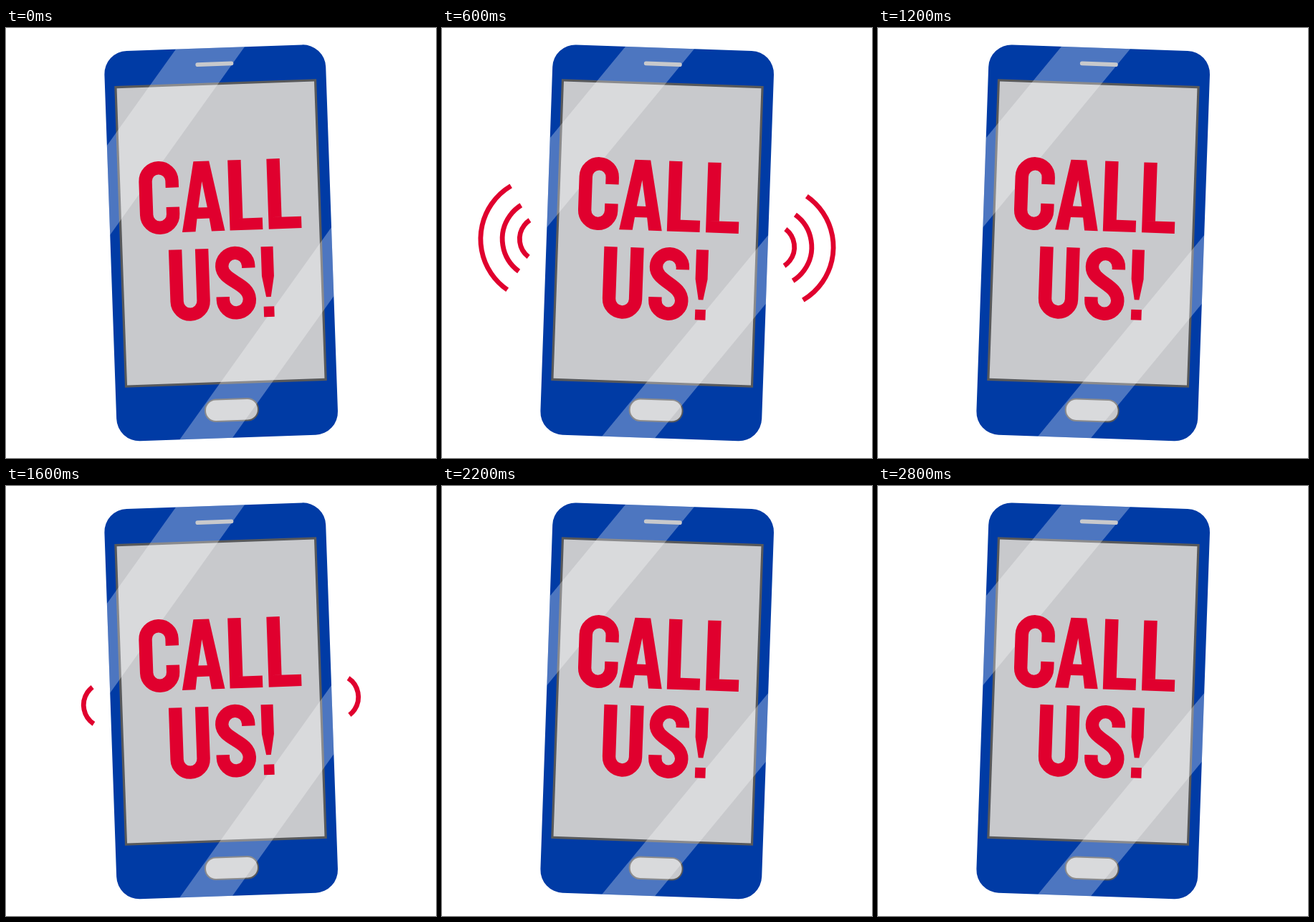
Animation, 600 px wide and 600 px high, one loop 3.2 s. Source, as an HTML page with a canvas:

```html
<!DOCTYPE html>
<html lang="en">
<head>
<meta charset="utf-8">
<title>Call us!</title>
<style>
html, body { margin: 0; width: 100%; height: 100%; overflow: hidden; background: #fff; }
canvas { display: block; width: 600px; height: 600px; }
</style>
</head>
<body>
<canvas id="stage" width="600" height="600" role="img" aria-label="CALL US!"></canvas>
<script>
const ctx = document.getElementById('stage').getContext('2d');
const BLUE = '#003ba5', GREY = '#c8c9cc', EDGE = '#58595b', RED = '#e0002e';
const SIZE = 600, MID = SIZE / 2, RAD = Math.PI / 180;
const STEP = 200, STEPS = 16;

// Lettering metrics: cap height, stem width, bowl radius, overshoot
const CAP = 98, STEM = 18.4, BOWL = 18.5, OVER = 2;

// Rounded box given by its centre
function box(cx, cy, w, h, r, fill, line) {
  ctx.beginPath();
  ctx.roundRect(cx - w / 2, cy - h / 2, w, h, r);
  ctx.fillStyle = fill;
  ctx.fill();
  if (!line) return;
  ctx.strokeStyle = EDGE;
  ctx.lineWidth = line;
  ctx.stroke();
}

// Slanted light band, x and width measured at height y
function sheen(x, y, w) {
  const slope = 0.769, top = x + y * slope, low = top - SIZE * slope;
  ctx.beginPath();
  ctx.moveTo(top, 0);
  ctx.lineTo(top + w, 0);
  ctx.lineTo(low + w, SIZE);
  ctx.lineTo(low, SIZE);
  ctx.fillStyle = 'rgba(255,255,255,0.3)';
  ctx.fill();
}

function phone() {
  box(MID + 0.2, MID - 0.2, 309, 544.6, 32, BLUE);
  ctx.save();
  ctx.clip();
  box(MID, 286.5, 278.8, 417.8, 0, GREY, 3.2);
  box(306.8, 533.4, 74, 30.6, 15, GREY, 2);
  sheen(246.5, 27.5, 96);
  sheen(232.5, 572.5, 73.8);
  ctx.restore();
  box(MID - 0.4, 50.1, 53, 5.8, 2.9, GREY);
}

// Closed shape mirrored about cx, from [half width, y] pairs
function mirrored(cx, y, pairs) {
  pairs.forEach(([dx, dy], i) => ctx[i ? 'lineTo' : 'moveTo'](cx + dx, y + dy));
  [...pairs].reverse().forEach(([dx, dy]) => ctx.lineTo(cx - dx, y + dy));
  ctx.closePath();
}

function letterA(cx, y) {
  mirrored(cx, y, [[10.9, 0], [29.8, CAP], [11.2, CAP], [8.6, 80]]);
  mirrored(cx, y, [[0, 28], [6.3, 64.5]]);
}

function letterL(x, y) {
  ctx.rect(x, y, STEM, CAP - 16.4);
  ctx.rect(x, y + CAP - 16.4, 45.8, 16.4);
}

function bang(cx, y) {
  mirrored(cx, y, [[8.5, 0], [8.5, 41], [3.3, 70]]);
  ctx.rect(cx - 7.3, y + CAP - 14.5, 14.6, 14.5);
}

// Centres of the upper and lower bowl of a round letter
const upper = y => y - OVER + STEM / 2 + BOWL;
const lower = y => y + CAP + OVER - STEM / 2 - BOWL;

function letterC(cx, y) {
  ctx.moveTo(cx + BOWL, y + 35.3);
  ctx.arc(cx, upper(y), BOWL, 0, Math.PI, true);
  ctx.arc(cx, lower(y), BOWL, Math.PI, 0, true);
  ctx.lineTo(cx + BOWL, y + 62.4);
}

function letterU(cx, y) {
  ctx.moveTo(cx - BOWL, y);
  ctx.arc(cx, lower(y), BOWL, Math.PI, 0, true);
  ctx.lineTo(cx + BOWL, y);
}

function letterS(cx, y) {
  const a = upper(y), b = lower(y);
  ctx.moveTo(cx + BOWL, y + 28.7);
  ctx.arc(cx, a, BOWL, 0, Math.PI, true);
  ctx.bezierCurveTo(cx - BOWL, a + 21, cx + BOWL, b - 23, cx + BOWL, b);
  ctx.arc(cx, b, BOWL, 0, Math.PI);
  ctx.lineTo(cx - BOWL, y + 68);
}

function lettering() {
  const call = 185, us = 307.3;
  ctx.fillStyle = ctx.strokeStyle = RED;
  ctx.lineWidth = STEM;

  ctx.beginPath();
  letterA(276.3, call);
  letterL(313.2, call);
  letterL(367.4, call);
  bang(363.8, us);
  ctx.fill('evenodd');

  ctx.beginPath();
  letterC(216.1, call);
  letterU(254.3, us);
  letterS(318.6, us);
  ctx.stroke();
}

function waves(count) {
  ctx.strokeStyle = RED;
  ctx.lineWidth = 6.8;
  for (let i = 0; i < count; i++) {
    const r = 31.5 + 21 * i + 3.1 * i * i, half = (54.5 + 1.5 * i) * RAD;
    for (const side of [0, Math.PI]) {
      ctx.beginPath();
      ctx.arc(MID + 160.3 * Math.cos(side), MID, r, side - half, side + half);
      ctx.stroke();
    }
  }
}

function draw(ms) {
  const n = Math.floor(ms / STEP) % STEPS;
  const tilt = n & 2 ? 2 : -2;
  // The ring builds up twice per loop, the second time from step 7
  const ring = n < 7 ? n : n - 7;

  ctx.setTransform(1, 0, 0, 1, 0, 0);
  ctx.fillStyle = '#fff';
  ctx.fillRect(0, 0, SIZE, SIZE);
  ctx.translate(MID, MID);
  ctx.rotate(tilt * RAD);
  ctx.translate(-MID, -MID);
  phone();
  lettering();
  waves(ring < 4 ? ring : 0);
}

const start = performance.now();
function tick() {
  draw(performance.now() - start);
  requestAnimationFrame(tick);
}
tick();
</script>
</body>
</html>
```
